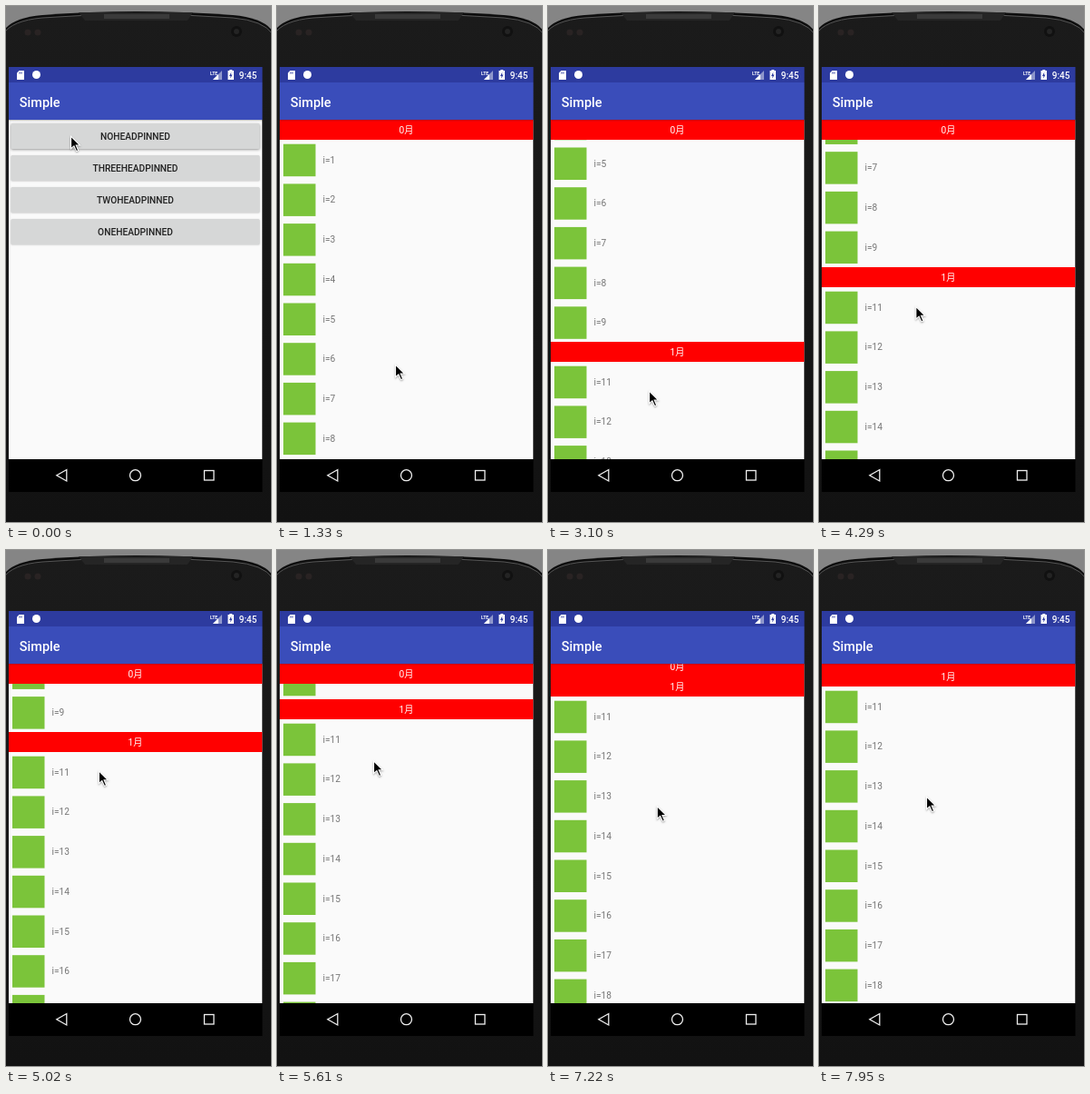
Animation, 292 px wide and 567 px high, one loop 8000 ms. Source, as an HTML page with a canvas:

```html
<!DOCTYPE html>
<html lang="en">
<head>
<meta charset="utf-8">
<title>Pinned headers</title>
<style>
html, body { margin: 0; width: 100%; height: 100%; overflow: hidden; background: #111; }
canvas { display: block; }
</style>
</head>
<body>
<canvas id="stage" width="292" height="567"></canvas>
<script>
const ctx = document.getElementById('stage').getContext('2d');
const LOOP = 8000, STEP = 147.2;
const LEFT = 3, WIDTH = 279.5, MID = 142.5;
const TOP = 125, HEIGHT = 373;
const ROW = 43.7, HEAD = 22, SLOP = 9;
const FONT = 'Roboto, "Noto Sans CJK SC", "Noto Sans CJK JP", sans-serif';
const BUTTONS = ['NO', 'THREE', 'TWO', 'ONE'];

// Where the pointer and the list are at the end of each gesture
const GESTURES = [
  { end: 0, x: 71, y: 142, scroll: 0 },
  { end: 3 },
  { end: 6, x: 132, y: 482 },
  { end: 9, x: 130, y: 393 },
  { end: 16, x: 110, y: 231, scroll: 171 },
  { end: 21, x: 111, y: 422 },
  { end: 23.7 },
  { end: 36.1, x: 100, y: 205, scroll: 376.5 },
  { end: 44, x: 125, y: 312 },
  { end: 54, x: 118, y: 270, scroll: 412.5, power: 2 }
];

const mix = (a, b, u) => a + (b - a) * u;

function pose(step) {
  let from = GESTURES[0];
  for (const gesture of GESTURES.slice(1)) {
    const to = { ...from, power: 1, ...gesture };
    if (step < to.end) {
      const u = 1 - ((to.end - step) / (to.end - from.end)) ** to.power;
      const way = Math.abs(to.y - from.y);
      const pull = Math.max(0, u * way - SLOP) / (way - SLOP);
      return {
        x: mix(from.x, to.x, u),
        y: mix(from.y, to.y, u),
        scroll: mix(from.scroll, to.scroll, pull)
      };
    }
    from = to;
  }
  return from;
}

function rect(x, y, w, h, fill) {
  ctx.fillStyle = fill;
  ctx.fillRect(x, y, w, h);
}

function poly(points, fill) {
  ctx.beginPath();
  points.forEach(([x, y]) => ctx.lineTo(x, y));
  ctx.closePath();
  if (fill) {
    ctx.fillStyle = fill;
    ctx.fill();
  }
}

function disc(x, y, r, fill) {
  ctx.beginPath();
  ctx.arc(x, y, r, 0, Math.PI * 2);
  if (fill) {
    ctx.fillStyle = fill;
    ctx.fill();
  }
}

function text(str, x, y, size, fill, weight = 400, align = 'left') {
  ctx.font = `${weight} ${size}px ${FONT}`;
  ctx.textAlign = align;
  ctx.fillStyle = fill;
  ctx.fillText(str, x, y);
}

function clipTo(x, y, w, h, draw) {
  ctx.save();
  ctx.beginPath();
  ctx.rect(x, y, w, h);
  ctx.clip();
  draw();
  ctx.restore();
}

function fade(y0, y1, from, to) {
  const g = ctx.createLinearGradient(0, y0, 0, y1);
  g.addColorStop(0, from);
  g.addColorStop(1, to);
  return g;
}

function shell(dy) {
  ctx.beginPath();
  ctx.moveTo(-3, 570);
  ctx.lineTo(-3, 28 + dy);
  ctx.quadraticCurveTo(6, 13 + dy, 40, 10 + dy);
  ctx.quadraticCurveTo(MID, 2 + dy, 250, 10 + dy);
  ctx.quadraticCurveTo(284, 13 + dy, 294, 28 + dy);
  ctx.lineTo(294, 570);
}

function phone() {
  rect(0, 0, 292, 567, '#858585');
  shell(0);
  ctx.fillStyle = '#0d0d0d';
  ctx.fill();
  shell(3);
  ctx.fillStyle = fade(8, 567, '#1b1b1b', '#121212');
  ctx.fill();
  ctx.strokeStyle = '#555';
  ctx.lineWidth = 1;
  ctx.stroke();

  poly([[80, 7], [206, 7], [200, 16], [87, 16]], '#252525');
  rect(108, 9, 72, 5, '#3a3a3a');
  disc(24, 29, 3.5, '#292323');
  disc(35, 29, 3.5, '#292323');
  disc(254, 28, 6, '#111');
  disc(254, 28, 3, '#242424');
}

function bars() {
  const status = '#2d3b9f';
  rect(LEFT, 67, WIDTH, 17, status);
  rect(LEFT, 84, WIDTH, 41, '#3a4dba');
  text('Simple', 14.8, 111, 14.5, '#fff', 500);

  poly([[14.5, 71], [20, 71], [20, 81], [12, 81], [12, 73.5]], '#fff');
  rect(14.5, 72.5, 1, 2, status);
  rect(16.5, 72.5, 1, 2, status);
  disc(33.5, 75.5, 4.5, '#fff');

  poly([[238, 71], [238, 81], [228, 81]], '#8e96cb');
  poly([[234, 75], [234, 81], [228, 81]], '#fff');
  text('LTE', 225, 75.5, 5, '#fff', 700);

  rect(246.3, 70, 3, 2, '#fff');
  rect(244.5, 71, 6.5, 10, '#fff');
  poly([[248.3, 72.5], [246, 77], [247.5, 77], [247.2, 79.8], [249.5, 75.5], [248, 75.5]], status);
  text('9:45', 276.4, 79.5, 10, '#fff', 500, 'right');
}

function nav() {
  rect(LEFT, TOP + HEIGHT, WIDTH, 36, '#000');
  ctx.strokeStyle = '#eee';
  ctx.lineWidth = 1.3;
  poly([[66.8, 509.5], [66.8, 522], [55.8, 515.7]]);
  ctx.stroke();
  disc(MID, 515.7, 6);
  ctx.stroke();
  ctx.strokeRect(218.5, 510.5, 10.5, 10.5);
}

function menu(step) {
  rect(LEFT, TOP, WIDTH, HEIGHT, '#fafafa');
  BUTTONS.forEach((word, i) => {
    const y = 129 + i * 35;
    ctx.save();
    ctx.shadowColor = i ? 'rgba(0,0,0,.22)' : 'rgba(0,0,0,.4)';
    ctx.shadowBlur = i ? 1.5 : 3;
    ctx.shadowOffsetY = i ? 0.5 : 1;
    ctx.beginPath();
    ctx.roundRect(5.5, y, 274, 28, 1.5);
    ctx.fillStyle = '#d6d7d7';
    ctx.fill();
    ctx.restore();
    if (!i && step > 0) {
      clipTo(5.5, y, 274, 28, () => disc(71, 142, step * 95, 'rgba(0,0,0,.12)'));
    }
    text(word + 'HEADPINNED', MID, y + 17.6, 10.2, '#212121', 500, 'center');
  });
}

function header(month, y) {
  rect(LEFT, y, WIDTH, HEAD, '#f00');
  text(month + '月', MID, y + 15, 10.2, '#fff', 400, 'center');
}

function row(n, y) {
  rect(7, y + 4.7, 35.5, 35.5, '#7bc43a');
  text('i=' + n, 50.5, y + 25.7, 10.2, '#757575');
}

function list(scroll) {
  rect(LEFT, TOP, WIDTH, HEIGHT, '#fafafa');
  const first = TOP + HEAD - scroll;
  const next = Math.round(first + 9 * ROW);
  for (let i = 0; i < 9; i++) {
    row(i + 1, first + i * ROW);
    row(i + 11, next + HEAD + i * ROW);
  }
  header(1, next);
  header(0, Math.min(TOP, next - HEAD));
}

function pointer(x, y) {
  ctx.save();
  ctx.translate(x, y);
  ctx.shadowColor = 'rgba(0,0,0,.35)';
  ctx.shadowBlur = 2;
  ctx.shadowOffsetY = 1;
  poly([[0, 0], [0, 16], [3.7, 12.6], [6.4, 18.3], [9.4, 17], [6.9, 11.4], [11.8, 11.4]], '#fff');
  ctx.shadowColor = 'transparent';
  poly([[1.1, 2.6], [1.1, 13.5], [4.1, 10.9], [6.9, 16.9], [8, 16.4], [5.4, 10.4], [9.2, 10.4]], '#000');
  ctx.restore();
}

function draw(time) {
  const step = Math.floor((time % LOOP) / STEP);
  const { x, y, scroll } = pose(step);
  phone();
  bars();
  clipTo(LEFT, TOP, WIDTH, HEIGHT, () => {
    if (step < 4) menu(step);
    if (step === 3) {
      ctx.globalAlpha = 0.5;
      ctx.translate(0, 16);
    }
    if (step > 2) list(scroll);
  });
  rect(LEFT, TOP, WIDTH, 2, fade(TOP, TOP + 2, 'rgba(0,0,0,.25)', 'rgba(0,0,0,0)'));
  nav();
  pointer(x, y);
}

const start = performance.now();
function tick() {
  draw(performance.now() - start);
  requestAnimationFrame(tick);
}
tick();
</script>
</body>
</html>
```
